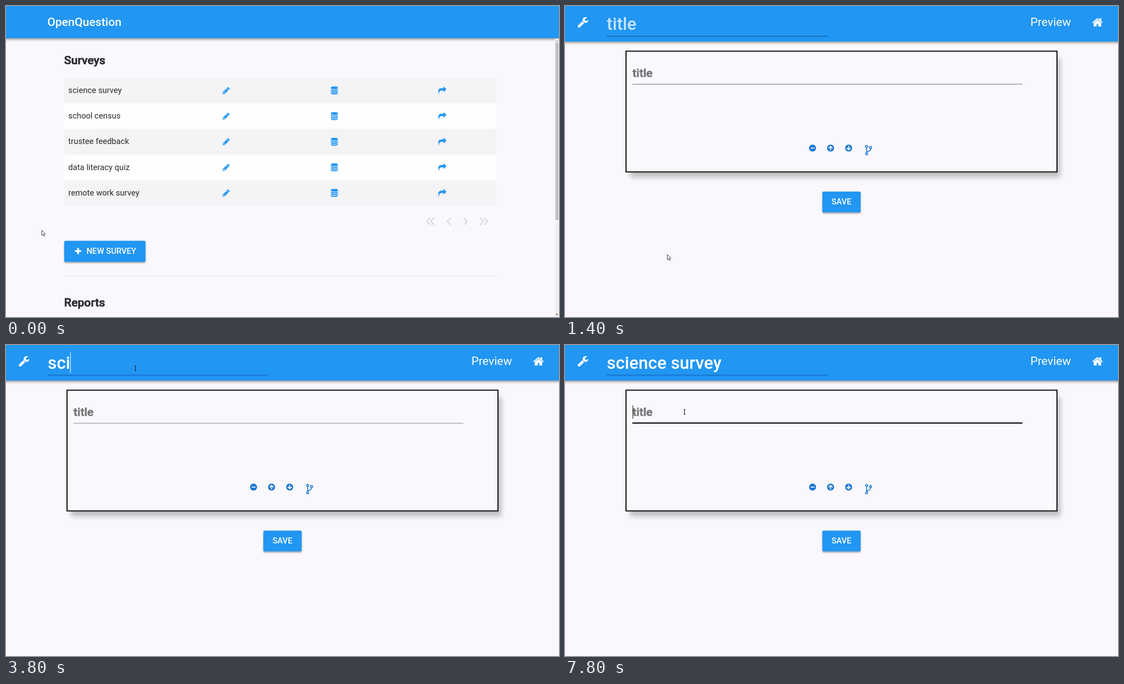
An HTML page that plays this animation: 997 by 561 pixels, repeating every 8000 ms.

```html
<!DOCTYPE html>
<html lang="en">
<head>
<meta charset="utf-8">
<title>Survey builder</title>
<style>
  html, body { margin: 0; width: 100%; height: 100%; overflow: hidden; background: #faf8fc; }
  svg.stage { display: block; width: 100vw; height: 100vh; }
  text { font-family: Roboto, Arial, sans-serif; white-space: pre; }
  .bar { fill: #2196f3; filter: drop-shadow(0 2px 2.5px rgba(0,0,0,.45)); }
  .brand { font-size: 21px; font-weight: 500; fill: #fff; }
  .nav { font-size: 21px; fill: #fff; }
  .head { font-size: 21px; font-weight: 500; fill: #2b2a2c; stroke: #2b2a2c; stroke-width: .7px; }
  .cell { font-size: 14.7px; fill: #2b2a2c; }
  .label { font-size: 14.7px; font-weight: 500; fill: #fff; }
  .field { font-size: 31.2px; font-weight: 500; }
  .btn { fill: #2196f3; filter: drop-shadow(0 2px 1.5px rgba(0,0,0,.35)); }
  .hover .btn { fill: #1976d2; filter: drop-shadow(0 4px 4px rgba(0,0,0,.38)); }
  .hover { transform: translateY(-1px); }
  .blue { fill: #2196f3; }
  .white { fill: #fff; }
  .pager { fill: none; stroke: #d0cfd2; stroke-width: 1.7px; }
  .disc { fill: #1976d2; }
  .mark { fill: none; stroke: #faf8fc; stroke-width: 1.8px; }
  .fork { fill: none; stroke: #1976d2; stroke-width: 1.5px; }
  .hint { fill: #757476; stroke: #757476; }
  .shade { fill: #000; opacity: .24; filter: blur(5px); }
</style>
</head>
<body>
<svg class="stage" viewBox="0 0 997 561" preserveAspectRatio="none">
  <defs>
    <symbol id="pencil" viewBox="0 0 1792 1792"><path d="M491 1536l91-91-235-235-91 91v107h128v128h107zm523-928q0-22-22-22-10 0-17 7l-542 542q-7 7-7 17 0 22 22 22 10 0 17-7l542-542q7-7 7-17zm-54-192l416 416-832 832h-416v-416zm683 96q0 53-37 90l-166 166-416-416 166-165q36-38 90-38 53 0 91 38l235 234q37 39 37 91z"/></symbol>
    <path id="band" d="M896 768q237 0 443-43t325-127v170q0 69-103 128t-280 93.5-385 34.5-385-34.5-280-93.5-103-128v-170q119 84 325 127t443 43z"/>
    <symbol id="data" viewBox="0 0 1792 1792">
      <path d="M896 0q208 0 385 34.5t280 93.5 103 128v128q0 69-103 128t-280 93.5-385 34.5-385-34.5-280-93.5-103-128v-128q0-69 103-128t280-93.5 385-34.5z"/>
      <use href="#band"/><use href="#band" y="384"/><use href="#band" y="768"/>
    </symbol>
    <symbol id="share" viewBox="0 0 1792 1792"><path d="M1792 640q0 26-19 45l-512 512q-19 19-45 19t-45-19-19-45v-256h-224q-98 0-175.500 6t-154 21.500-133 42.500-105.500 69.500-80 101-48.500 138.500-17.500 181q0 55 5 123 0 6 2.500 23.500t2.500 26.500q0 15-8.500 25t-23.500 10q-16 0-28-17-7-9-13-22t-13.500-30-10.500-24q-127-285-127-451 0-199 53-333 162-403 875-403h224v-256q0-26 19-45t45-19 45 19l512 512q19 19 19 45z"/></symbol>
    <symbol id="plus" viewBox="0 0 1792 1792"><path d="M1600 736v192q0 40-28 68t-68 28h-416v416q0 40-28 68t-68 28h-192q-40 0-68-28t-28-68v-416h-416q-40 0-68-28t-28-68v-192q0-40 28-68t68-28h416v-416q0-40 28-68t68-28h192q40 0 68 28t28 68v416h416q40 0 68 28t28 68z"/></symbol>
    <symbol id="wrench" viewBox="0 0 1792 1792"><path d="M448 1472q0-26-19-45t-45-19-45 19-19 45 19 45 45 19 45-19 19-45zm644-420l-682 682q-37 37-90 37-52 0-91-37l-106-108q-38-36-38-90 0-53 38-91l681-681q39 98 114.500 173.500t173.500 114.500zm634-435q0 39-23 106-47 134-164.500 217.500t-258.500 83.500q-185 0-316.500-131.500t-131.500-316.500 131.500-316.500 316.500-131.500q58 0 121.500 16.500t107.500 46.500q16 11 16 28t-16 28l-293 169v224l193 107q5-3 79-48.500t135.500-81 70.500-35.500q15 0 23.500 10t8.500 25z"/></symbol>
    <symbol id="home" viewBox="0 0 1792 1792"><path d="M1472 992v480q0 26-19 45t-45 19h-384v-384h-256v384h-384q-26 0-45-19t-19-45v-480q0-1 .5-3t.5-3l575-474 575 474q1 2 1 6zm223-69l-62 74q-8 9-21 11h-3q-13 0-21-7l-692-577-692 577q-12 8-24 7-13-2-21-11l-62-74q-8-10-7-23.500t11-21.500l719-599q32-26 76-26t76 26l244 204v-195q0-14 9-23t23-9h192q14 0 23 9t9 23v408l219 182q10 8 11 21.500t-7 23.500z"/></symbol>
  </defs>

  <g id="list">
    <rect class="bar" x="-10" y="-10" width="1017" height="68"/>
    <text class="brand" x="74.500" y="36">OpenQuestion</text>
    <text class="head" x="104.800" y="105">Surveys</text>
    <g id="rows"></g>
    <path class="pager" d="M765 382l-6 6.500 6 6.500M772 382l-6 6.500 6 6.500M802 382l-6.500 6.500 6.500 6.500M825 382l6.500 6.500-6.500 6.500M855 382l6 6.500-6 6.500M862 382l6 6.500-6 6.500"/>
    <g id="add">
      <rect class="btn" x="105" y="423.500" width="146.500" height="38" rx="2"/>
      <use class="white" href="#plus" x="122.600" y="435.200" width="14.700" height="14.700"/>
      <text class="label" x="145.200" y="447.300">NEW SURVEY</text>
    </g>
    <rect x="105" y="486" width="779" height="1.200" fill="#e6e5e8"/>
    <text class="head" x="104.800" y="542.300">Reports</text>
    <rect x="989.500" y="59" width="7.500" height="502" fill="#f1f0f2"/>
    <rect x="990.500" y="66" width="5.500" height="320" fill="#c1c0c2"/>
    <path d="M991 64l2.200-2.500 2.200 2.500z" fill="#a0a0a2"/>
    <path d="M991 555.500l2.200 2.500 2.200-2.500z" fill="#505052"/>
  </g>

  <g id="form">
    <rect class="bar" x="-10" y="-10" width="1017" height="74"/>
    <use class="white" href="#wrench" x="21.900" y="18.400" width="21" height="21"/>
    <text class="field" id="name" x="75.300" y="43"></text>
    <rect id="nameLine" x="75" y="54" width="398.500" height="1.200"/>
    <rect id="nameFocus" y="53.400" height="2" fill="#1976d2"/>
    <rect id="nameCaret" y="13" width="1.100" height="37.500" fill="#e4f2fe"/>
    <text class="nav" x="838.900" y="36">Preview</text>
    <use class="white" href="#home" x="949.500" y="19" width="21" height="21"/>

    <rect class="shade" x="117" y="94" width="776" height="215"/>
    <rect x="110" y="81.500" width="777" height="217.800" fill="#faf8fc" stroke="#111" stroke-width="2"/>
    <text class="head hint" x="121.800" y="127.500">title</text>
    <rect id="askLine" x="121.500" y="140.400" width="703" height="1.400"/>
    <rect id="askFocus" y="139.600" height="2" fill="#111"/>
    <rect id="askCaret" x="121.800" y="109" width="1.100" height="24" fill="#222"/>
    <g class="disc">
      <circle cx="446.300" cy="256.300" r="6.300"/>
      <circle cx="478.800" cy="256.300" r="6.300"/>
      <circle cx="511.400" cy="256.300" r="6.300"/>
    </g>
    <path class="mark" d="M442.800 256.300h7M478.800 260.500v-7M475.300 256.700l3.500-3.500 3.500 3.500M511.400 252.200v7M507.900 256l3.500 3.500 3.500-3.500"/>
    <g class="fork">
      <circle cx="543.800" cy="253.500" r="1.900"/>
      <circle cx="550.900" cy="255.200" r="1.900"/>
      <circle cx="543.800" cy="266.600" r="1.900"/>
      <path d="M543.800 255.400v9.300M550.900 257.100q0 4-3.500 4.900-3.600.7-3.600 2.700"/>
    </g>
    <rect class="btn" x="464" y="334.700" width="69" height="37.500" rx="2"/>
    <text class="label" x="480.500" y="358.200">SAVE</text>
  </g>

  <g id="cursor">
    <path id="arrow" d="M0 0v9l2.100-1.800 1.500 3.300 1.600-.7-1.400-3.200h2.700z" fill="#fff" stroke="#333" stroke-width=".9"/>
    <path id="hand" d="M-.8.600q.9-1 1.600 0v3l3.200.9q.8.400.7 1.400l-.6 3.600h-4.500l-2.900-3.600q.3-1.300 1.500-.7l1 .8z" fill="#fff" stroke="#222" stroke-width=".9"/>
    <path id="beam" d="M-1.700-4.200h3.400M0-4.200v8.400M-1.700 4.200h3.400" fill="none" stroke="#222" stroke-width="1.100"/>
  </g>
</svg>
<script>
const LOOP = 8000, STEP = 200;
const $ = id => document.getElementById(id);
const show = (id, on) => $(id).setAttribute('visibility', on ? 'inherit' : 'hidden');
const set = (id, attrs) => { for (const k in attrs) $(id).setAttribute(k, attrs[k]); };

const surveys = ['science survey', 'school census', 'trustee feedback', 'data literacy quiz', 'remote work survey'];
const icons = { pencil: 389.7, data: 584.7, share: 779.2 };
$('rows').innerHTML = surveys.map((name, i) => {
  const y = 129.3 + i * 46.2;
  const marks = Object.keys(icons).map(k =>
    `<use class="blue" href="#${k}" x="${icons[k]}" y="${y + 15.7}" width="14.7" height="14.7"/>`).join('');
  return `<rect x="105" y="${y}" width="779" height="46.2" fill="${i % 2 ? '#fefefe' : '#f4f3f5'}"/>` +
    `<text class="cell" x="112.3" y="${y + 27.7}">${name}</text>${marks}`;
}).join('');

// [time, x, y] of the pointer hot spot
const path = [[200, 64.5, 404.5], [1200, 184.5, 448.5], [1400, 184.5, 448.5],
  [2200, 191.5, 64], [2600, 233.5, 42], [6800, 233.5, 42], [7400, 215.5, 120.5]];
// [time, letters typed]
const typing = [[3400, 1], [3600, 2], [3800, 3], [4000, 4], [4400, 6], [4600, 7], [5000, 8],
  [5400, 9], [5600, 10], [5800, 11], [6000, 12], [6200, 13], [6400, 14]];

function pointer(t) {
  let a = path[0];
  for (const b of path) {
    if (t < b[0]) {
      const p = Math.max(0, (t - a[0]) / (b[0] - a[0] || 1));
      const e = p * p * (3 - 2 * p);
      return [a[1] + (b[1] - a[1]) * e, a[2] + (b[2] - a[2]) * e];
    }
    a = b;
  }
  return [a[1], a[2]];
}

// focus line spreads from the click point
function spread(id, t, start, from, left, right) {
  const p = t < start ? 0 : t < start + STEP ? .6 : 1;
  const x = from + (left - from) * p;
  set(id, { x, width: from + (right - from) * p - x });
}

function draw(time) {
  const t = Math.floor((time % LOOP) / STEP) * STEP;
  const form = t >= 1400;
  const [x, y] = pointer(t);
  show('list', !form);
  show('form', form);

  const onAdd = !form && x > 105 && y > 423;
  const inName = form && y < 56;
  const inAsk = form && t > 6800 && y > 104;
  $('add').setAttribute('class', onAdd ? 'hover' : '');
  $('cursor').setAttribute('transform', `translate(${x} ${y})`);
  show('hand', onAdd);
  show('beam', inName || inAsk);
  show('arrow', !onAdd && !inName && !inAsk);

  let count = 0;
  for (const [at, n] of typing) if (t >= at) count = n;
  $('name').textContent = count ? 'science survey'.slice(0, count) : 'title';
  $('name').setAttribute('fill', count ? '#fff' : '#c8e5fc');
  show('nameCaret', form && t >= 2800 && t < 7600);
  const width = count && form ? $('name').getComputedTextLength() : 0;
  set('nameCaret', { x: 75.3 + width });
  set('nameLine', { fill: t < 2800 ? '#135a94' : '#1976d2' });
  spread('nameFocus', t, 2800, 233, 75, 473.5);

  set('askLine', { fill: inAsk ? '#333' : t < 2600 ? '#949396' : '#a9a8ab' });
  spread('askFocus', t, 7600, 215, 121.5, 824.5);
  show('askCaret', form && t >= 7600);
}

const began = performance.now();
function tick() {
  draw(performance.now() - began);
  requestAnimationFrame(tick);
}
tick();
</script>
</body>
</html>
```
